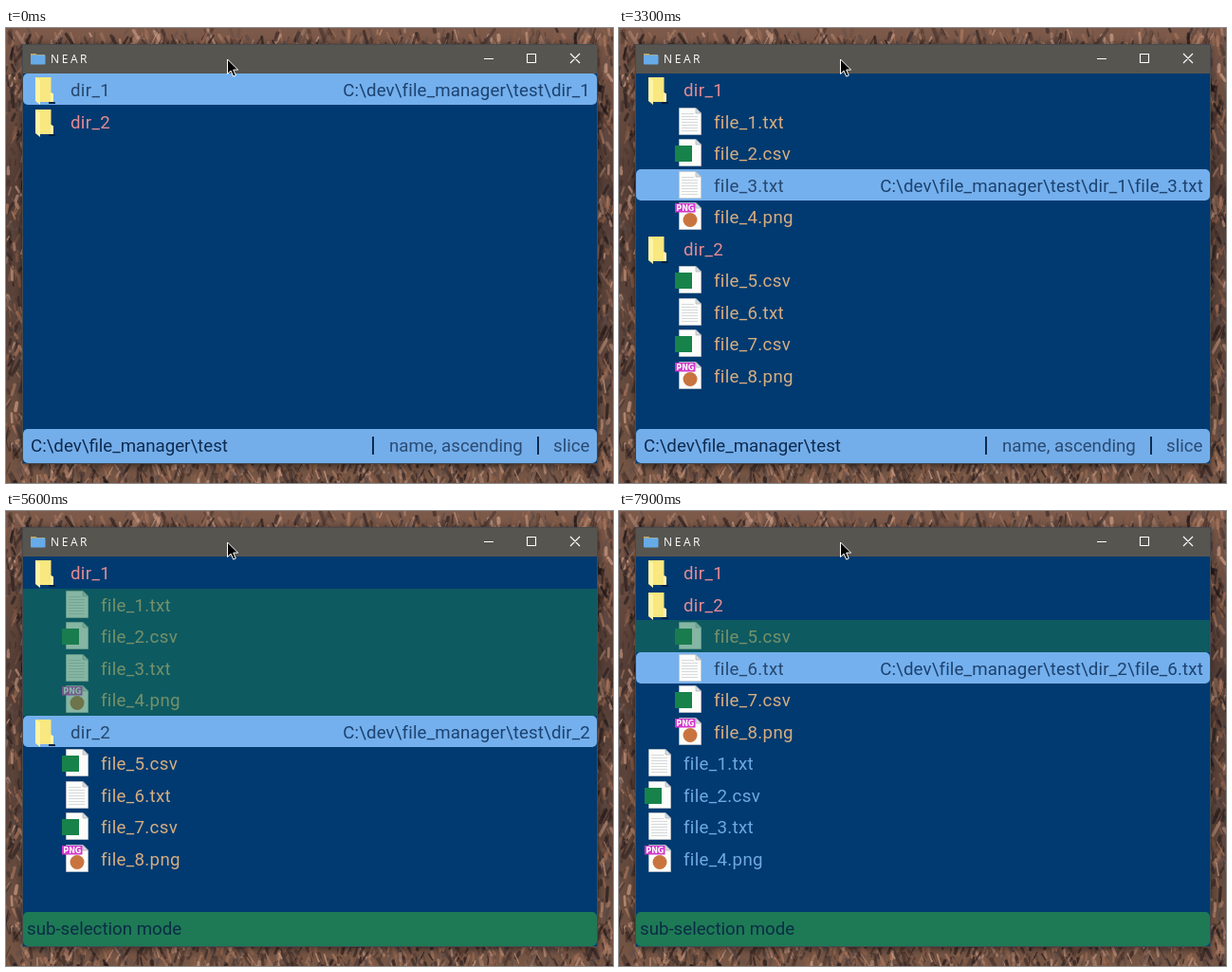
Animation, 640 px wide and 480 px high, one loop 8000 ms. Source, as an HTML page with a canvas:

```html
<!DOCTYPE html>
<html lang="en">
<head>
<meta charset="utf-8">
<title>NEAR</title>
<style>
  html, body { margin: 0; width: 100%; height: 100%; overflow: hidden; background: #4a342c; }
  canvas, svg { position: absolute; left: 0; top: 0; width: 640px; height: 480px; }
  text { font: 18.7px Roboto, sans-serif; white-space: pre; }
  .label { letter-spacing: .32px; }
  .path { letter-spacing: .14px; text-anchor: end; fill: #1c4270; }
  .title { font: 12px "Open Sans", sans-serif; letter-spacing: 2.6px; fill: #fff; }
  .tag { font: bold 8px "DejaVu Sans", sans-serif; fill: #fff; }
</style>
</head>
<body>
<canvas id="wood" width="640" height="480"></canvas>
<svg viewBox="0 0 640 480">
  <defs>
    <filter id="soft" x="-5%" y="-5%" width="110%" height="110%"><feGaussianBlur stdDeviation="4"/></filter>
    <clipPath id="frame"><rect x="18" y="48" width="605" height="411"/></clipPath>
    <g id="dir">
      <path d="M45 28l7 2.500v1.500h-7z" fill="#04203f"/>
      <path d="M31 4H47.500V20L50 21.500V30H37L31 29z" fill="#f9e77f"/>
      <path d="M47 20l3 1.500V30h-3z" fill="#fff3b0"/>
      <path d="M31 4l5 3v26l-5-4z" fill="#fff4a4"/>
    </g>
    <g id="page">
      <path d="M31.500 2.500H49l5.500 5.500V30.500h-23z" fill="#fcfcfa" stroke="#c6cace" stroke-width=".7"/>
      <path d="M49 2.500V8h5.500z" fill="#d9dde0" stroke="#9da5ad" stroke-width=".6"/>
    </g>
    <g id="txt">
      <use href="#page"/>
      <path d="M34 8.500h13M34 11.500h17M34 14.500h17M34 17.500h17M34 20.500h17M34 23.500h17M34 26.500h17" stroke="#d6d9dc"/>
    </g>
    <g id="csv">
      <use href="#page"/>
      <rect x="27" y="9" width="18" height="17" fill="#17834a"/>
    </g>
    <g id="png">
      <use href="#page"/>
      <circle cx="43" cy="20.500" r="7.500" fill="#c9743f"/>
      <rect x="27" y="3" width="21.500" height="9.500" fill="#d136cc"/>
      <text class="tag" x="28.300" y="10.800">PNG</text>
    </g>
  </defs>
  <rect x="18" y="19" width="605" height="442" fill="#000" opacity=".6" filter="url(#soft)"/>
  <rect x="17.500" y="17.500" width="606" height="442" fill="#003a70" stroke="#454a50"/>
  <rect x="18" y="18" width="605" height="30" fill="#575550"/>
  <path d="M26 27h5.500l1 1H41v3H26z" fill="#c9a860"/>
  <rect x="26" y="28.500" width="15.500" height="10" rx="1" fill="#66abe8"/>
  <text class="title" x="47" y="36.800">NEAR</text>
  <path d="M504 32.500h10M549.500 27.500h9v9h-9zM595 27l10 10M605 27l-10 10" fill="none" stroke="#fff" stroke-width="1.100"/>
  <g id="view" clip-path="url(#frame)"></g>
  <path d="M233.500 33v15.500l3.600-3.400 2.600 6 2.600-1.100-2.600-5.900h4.900z" fill="#000" stroke="#fff"/>
</svg>
<script>
const LOOP = 8000, PITCH = 33.5, ROOT = 'C:\\dev\\file_manager\\test';

// '>' marks a row inside the directory above it
const split = s => s.split(' ');
const one = '>file_1.txt >file_2.csv >file_3.txt >file_4.png';
const two = '>file_5.csv >file_6.txt >file_7.csv >file_8.png';
const closed = split('dir_1 dir_2');
const half = split(`dir_1 ${one} dir_2`);
const open = split(`dir_1 ${one} dir_2 ${two}`);
const moved = split(`dir_1 dir_2 ${two} ${one.replace(/>/g, '')}`);

// time, rows, cursor, first marked row, marked count, sub-selection
const steps = [
  [0, closed, 0],
  [1000, half, 0],
  [1700, half, 1],
  [1900, half, 2],
  [2000, half, 3],
  [2200, half, 4],
  [2400, half, 5],
  [2600, open, 5],
  [3000, open, 4],
  [3200, open, 3],
  [3500, open, 2],
  [3700, open, 1],
  [4700, open, 1, 1, 0, true],
  [4900, open, 2, 1, 1, true],
  [5100, open, 3, 1, 2, true],
  [5300, open, 4, 1, 3, true],
  [5500, open, 5, 1, 4, true],
  [5900, moved, 1],
  [7000, moved, 2],
  [7200, moved, 2, 2, 0, true],
  [7800, moved, 3, 2, 1, true]
];

const rowTop = i => Math.round(48 + PITCH * i);
const text = (x, y, s, fill, cls = '') => `<text class="${cls}" x="${x}" y="${y}" fill="${fill}">${s}</text>`;
const bar = (y, h, fill, r = 5) => `<rect x="18" y="${y}" width="605" height="${h}" rx="${r}" fill="${fill}"/>`;

function row(name, i, parent, selected, marked) {
  const y = rowTop(i), nested = name[0] === '>';
  const label = nested ? name.slice(1) : name;
  const kind = label.includes('.') ? label.slice(-3) : 'dir';
  const dx = nested ? 32 : 0;
  const fill = selected ? '#26476e' : kind === 'dir' ? '#e58b93' : nested ? '#d6ad80' : '#6ea9e2';
  let out = selected ? bar(y, 33, '#74b0ed') : '';
  out += `<use href="#${kind}" x="${dx}" y="${y}"/>` + text(68 + dx, y + 24, label, fill, 'label');
  if (selected) {
    const path = [ROOT, ...(nested ? [parent] : []), label].join('\\');
    out += text(616, y + 24, path, '', 'path');
  }
  if (marked) out += bar(y, rowTop(i + 1) - y, 'rgba(27,120,85,.52)', 0);
  return out;
}

function status(sub) {
  if (sub) return bar(423, 36, '#1d7a55') + text(22, 447, 'sub-selection mode', '#0c2c46');
  return bar(423, 36, '#74aeea') + text(26, 447, ROOT, '#0e2b50') +
    '<path d="M387 431v19M561 431v19" stroke="#0e2b50" stroke-width="2"/>' +
    text(404, 447, 'name, ascending', '#2a4b74') + text(577, 447, 'slice', '#2a4b74');
}

function scene([, rows, cursor, first = 0, count = 0, sub = false]) {
  let parent = '';
  return rows.map((name, i) => {
    if (name[0] !== '>') parent = name;
    return row(name, i, parent, i === cursor, i >= first && i < first + count);
  }).join('') + status(sub);
}

// Soft woodland tones with loose strokes of light and shade
function paintWood() {
  const c = document.getElementById('wood').getContext('2d');
  let seed = 90217;
  const rnd = () => (seed = seed * 16807 % 2147483647) / 2147483647;
  const base = c.createLinearGradient(0, 0, 0, 480);
  ['#7d5a4a', '#553e36', '#5c443a', '#765645'].forEach((tone, i) => base.addColorStop(i / 3, tone));
  c.fillStyle = base;
  c.fillRect(0, 0, 640, 480);
  const tones = ['#1d1517', '#2c2021', '#433029', '#5a4a48', '#8c5f49', '#b07b60', '#d0a088'];
  c.lineCap = 'round';
  for (let i = 0; i < 9000; i++) {
    const x = rnd() * 640, y = rnd() * 480, len = 3 + rnd() * 12;
    c.strokeStyle = tones[Math.floor(rnd() * tones.length)];
    c.globalAlpha = .3 + rnd() * .4;
    c.lineWidth = 1 + rnd() * 3;
    c.beginPath();
    c.moveTo(x, y);
    c.lineTo(x + (rnd() - .5) * len * 1.4, y + len);
    c.stroke();
  }
}

const view = document.getElementById('view');
let shown;
function draw() {
  const t = performance.now() % LOOP;
  const step = steps.findLast(s => s[0] <= t);
  if (step !== shown) view.innerHTML = scene(shown = step);
  requestAnimationFrame(draw);
}

paintWood();
draw();
</script>
</body>
</html>
```
